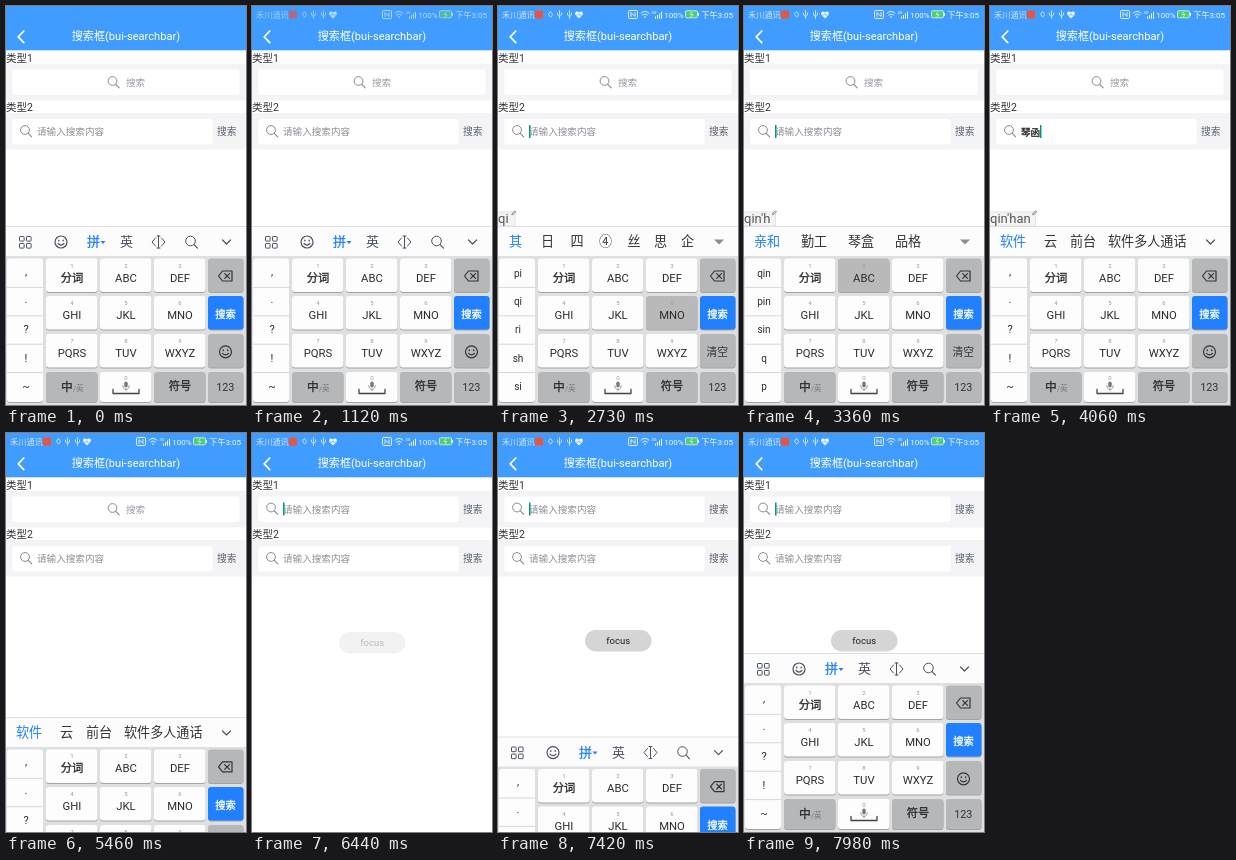
An HTML page for the animation above (8000 ms loop, 240x399 px).

```html
<!DOCTYPE html>
<html lang="zh-CN">
<head>
<meta charset="utf-8">
<title>搜索框</title>
<style>
  html, body { margin: 0; width: 100%; height: 100%; overflow: hidden; background: #fff; }
  svg { display: block; width: 100%; height: 100%; }
  text { font-family: Roboto, "Noto Sans CJK SC", "Noto Sans CJK", sans-serif; }
  .mid { text-anchor: middle; }
  .line { fill: none; stroke-linecap: round; stroke-linejoin: round; }
</style>
</head>
<body>
<svg id="stage" viewBox="0 0 240 399"></svg>
<script>
const LOOP = 8000, STEP = 70;
const BLUE = '#409cff', ACTION = '#2080ff', INK = '#4a5260', DARK = '#2b2b2b';
const KEY = '#fdfdfd', GREY = '#b6b7b8', DOWN = '#b9b9ba', TEAL = '#009688', HINT = '#8c9097';

const rect = (x, y, w, h, fill, more = '') =>
  `<rect x="${x}" y="${y}" width="${w}" height="${h}" fill="${fill}" ${more}/>`;
const text = (x, y, size, fill, s, more = '') =>
  `<text x="${x}" y="${y}" font-size="${size}" fill="${fill}" ${more}>${s}</text>`;
const mid = (x, y, size, fill, s, more = '') => text(x, y, size, fill, s, `class="mid" ${more}`);
const heavy = color => `stroke="${color}" stroke-width=".3"`;
const line = (d, color, w = 1, more = '') =>
  `<path class="line" d="${d}" stroke="${color}" stroke-width="${w}" ${more}/>`;
const ring = (x, y, r, color, w = 1) =>
  `<circle cx="${x}" cy="${y}" r="${r}" fill="none" stroke="${color}" stroke-width="${w}"/>`;
const group = (id, body) => `<g id="${id}">${body}</g>`;

const lens = (x, y, color, r = 4.4) =>
  ring(x, y, r, color) + line(`M${x + r * .75} ${y + r * .75}l3.4 3.6`, color, 1.1);
const smiley = (x, y, color) => ring(x, y, 6, color, 1.2) +
  line(`M${x - 2.2} ${y - 1.8}v.6M${x + 2.2} ${y - 1.8}v.6`, color, 1.4) +
  line(`M${x - 3} ${y + 1.5}q3 3.2 6 0`, color, 1.1);
const chevron = line('M216.5 234l4 4 4-4', INK, 1.2);

function statusBar() {
  const w = '#f2f8ff';
  const usb = x => line(`M${x} 4.5v8M${x - 2} 7v2l2 1.5 2-1.5v-2`, w, .7);
  return text(4, 12, 8.2, '#cfe4ff', '禾川通讯') +
    rect(37, 4.5, 8, 8, '#e8553f', 'rx="1"') +
    line('M52.7 5.8l2 2.7-2 2.7-2-2.7z', w, .7) + usb(61.5) + usb(71.5) +
    `<path d="M81 12.5l-3.6-3.6q-.9-3 1.6-3.4 1.4 0 2 1.3.6-1.3 2-1.3 2.5.4 1.6 3.4z" fill="${w}"/>` +
    line('M78.5 9h1.6l.9-1.3 1 2 .7-.7h1', BLUE, .6) +
    rect(130.5, 4.5, 9, 8, 'none', `stroke="${w}" stroke-width=".9" rx="1"`) +
    line('M133 10.5v-4l4 4v-4', w, .9) +
    line('M143 7.2q4-3.8 8 0M144.6 9q2.4-2.3 4.8 0', w, .9) +
    `<path d="M145.8 10.4h2.4l-1.2 1.8z" fill="${w}"/>` +
    text(153.5, 7.6, 4, w, '4G') +
    line('M157.5 12.3v-1.4M159.5 12.3v-2.8M161.5 12.3v-4.5M163.5 12.3v-6.2', w, 1) +
    text(166.3, 11.7, 8, w, '100%') +
    rect(187.5, 4.8, 12, 7, '#4fd06a', `rx="1" stroke="${w}" stroke-width=".7"`) +
    rect(199.8, 7, 1.2, 2.8, w) + line('M193.9 6l-1.8 2.5h2.8l-1.8 2.4', w, .7) +
    text(203.3, 12, 8.1, w, '下午3:05');
}

// Left-aligned bar with its own submit label; y is the top of the field
const activeBar = (y, id) => rect(6.3, y, 200.4, 25.5, '#fff', 'rx="2.5"') +
  lens(19, y + 11, '#8b8b8b') +
  text(31, y + 16.4, 9.6, HINT, '请输入搜索内容', `id="hint${id}"`) +
  text(211, y + 16.2, 9.8, '#596070', '搜索') +
  rect(31, y + 6, 1.5, 13, TEAL, `id="caret${id}"`);

function page() {
  return rect(0, 0, 240, 399, '#fff') + rect(0, 0, 240, 44.3, BLUE) +
    line('M17.8 25l-5.6 5.8 5.6 5.8', '#fff', 1.7) +
    mid(119.9, 34.2, 11.1, '#fff', '搜索框(bui-searchbar)') +
    group('status', statusBar()) +
    text(0, 55.8, 10.5, '#333', '类型1') + rect(0, 58, 240, 36.5, '#f4f4f6') +
    text(0, 105, 10.5, '#333', '类型2') + rect(0, 107, 240, 36.5, '#f4f4f6') +
    group('idle', rect(6.3, 63.5, 227.2, 25.5, '#fff', 'rx="2.5"') +
      lens(106.5, 75, '#8b8b8b') + text(120, 79.8, 9.6, '#989ca4', '搜索')) +
    group('first', activeBar(63.5, 1)) + activeBar(113, 2) +
    text(31, 129.5, 9.6, '#222', '琴函', `id="typed" ${heavy('#222')}`);
}

const cap = (x, y, w, h, fill, id = '') =>
  rect(x, y + 1, w, h, '#a3a4a6', 'rx="3"') +
  rect(x, y, w, h, fill, `rx="3" ${id && `id="${id}"`}`);

function keyboard() {
  const cols = [40, 94, 148], rows = [252.5, 290, 328];
  const names = ['分词', 'ABC', 'DEF', 'GHI', 'JKL', 'MNO', 'PQRS', 'TUV', 'WXYZ'];
  let s = rect(0, 220, 240, 200, '#dedfe0') + rect(0, 221, 240, 29, '#fcfcfd');

  s += group('tools',
    [[13, 230], [20, 230], [13, 237], [20, 237]].map(([x, y]) =>
      rect(x + .5, y + .5, 4.6, 4.6, 'none', `stroke="${INK}" rx=".6"`)).join('') +
    smiley(55, 236, INK) + text(81, 240.3, 13, ACTION, '拼', heavy(ACTION)) +
    `<path d="M94.5 235h5l-2.5 3z" fill="${ACTION}"/>` + text(114, 240.3, 13, INK, '英') +
    line('M149.5 232l-3.5 4 3.5 4M155.5 232l3.5 4-3.5 4M152.5 230v12M151 230h3M151 242h3', INK) +
    lens(184.5, 235, INK, 4.8) + chevron);
  s += group('words', '') + group('fold', chevron) +
    '<path id="more" d="M216 233.500h10l-5 5z" fill="#8b8d91"/>';

  s += cap(1, 252.5, 36, 143.5, KEY);
  for (let i = 1; i < 5; i++) s += rect(1, 252.5 + 28.4 * i, 36, 1, '#d6d7d9');
  s += group('side', '');

  names.forEach((name, i) => {
    const x = cols[i % 3], y = rows[i / 3 | 0];
    s += cap(x, y, 51.5, 33.5, KEY, 'key' + (i + 1)) +
      mid(x + 26, y + 9, 6, '#999', i + 1) +
      mid(x + 26, y + 23, 11.3, DARK, name, i ? '' : heavy(DARK));
  });

  s += cap(40, 366, 51.5, 30, GREY) + text(55, 384.5, 11.8, DARK, '中', heavy(DARK)) +
    text(67, 385, 7.5, '#777', '/英') +
    cap(94, 366, 51.5, 30, KEY) + mid(120, 373.5, 6, '#999', '0') +
    rect(118.3, 375.5, 3.4, 6, '#777', 'rx="1.7"') +
    line('M116.8 379.5q0 3.800 3.200 3.800t3.200-3.800M120 383.300v1.500', '#888', .8) +
    line('M107 383.500v4h26v-4', '#444', 1.3) +
    cap(148, 366, 51.5, 30, GREY) + mid(174, 384.2, 11.2, DARK, '符号', heavy(DARK));

  const x = 202, w = 35.5;
  s += cap(x, 252.5, w, 33.5, GREY) +
    line('M212.5 270l4-5h9.500v10h-9.500zM218.700 267.600l4.800 4.800M223.500 267.600l-4.800 4.800', '#333', 1.2) +
    cap(x, 290, w, 33.5, ACTION) + mid(219.5, 312, 10.3, '#fff', '搜索', heavy('#fff')) +
    cap(x, 328, w, 33.5, GREY) + group('face', smiley(219.5, 345.8, '#333')) +
    mid(219.3, 349.5, 10.8, '#333', '清空', 'id="clear"') +
    cap(x, 366, w, 30, GREY) + mid(219.3, 384.5, 10.8, '#333', '123');

  return s + group('popup',
    rect(-1, 206, 19, 14, '#f4f4f4', 'id="tag" stroke="#ddd" stroke-width=".8"') +
    text(0, 217.4, 13, '#555', '', 'id="pinyin"') +
    line('M-2 208.5l.5-1.5 2.5-2.2 1 1-2.5 2.3z', '#777', .8, 'id="pen"'));
}

const toast = () => rect(87, 197, 66.5, 21.5, '#d5d5d5', 'rx="10.7"') +
  mid(120.2, 211.2, 9.5, '#222', 'focus');

document.getElementById('stage').innerHTML =
  page() + group('toast', toast()) + group('board', keyboard());
const $ = id => document.getElementById(id);

const marks = [',', '.', '?', '!', '~'];
const single = [11, 43, 72.5, 101, 129.5, 156, 183], double = [10, 57, 104, 151];
const after = ['软件', '云', '前台', '软件多人通话'], afterX = [10, 54, 80, 118];
const syll = ['qin', 'pin', 'sin', 'q', 'p'], hs = ['han', 'gan', 'hao', 'gao', 'h'];
// start, pinyin, candidates, their x, side column
const states = [
  [0, '', null, single, marks],
  [2310, 'q', [...'去其日是四前人'], single, ['p', 'q', 'r', 's', '7']],
  [2590, 'qi', [...'其日四④丝思企'], single, ['pi', 'qi', 'ri', 'sh', 'si']],
  [2870, 'qin', [...'亲品琴拼勤贫秦'], single, syll],
  [3290, "qin'h", ['亲和', '勤工', '琴盒', '品格'], double, syll],
  [3500, "qin'ha", ['琴函', '品尝', '亲哈', '拼好'], double, hs],
  [3780, "qin'han", ['琴函', '亲汗', '勤干', '拼好'], double, hs],
  [3920, "qin'han", after, afterX, marks],
  [4130, '', after, afterX, marks],
  [5810, '', null, single, marks]
];
const presses = [[7, 1750, 2310], [4, 2450, 2590], [6, 2730, 2870],
  [4, 3150, 3290], [2, 3360, 3500], [6, 3570, 3780]];

const within = (t, a, b) => t >= a && t < b;
const clamp = v => Math.max(0, Math.min(1, v));
const show = (id, on) => { $(id).style.display = on ? '' : 'none'; };
let shown = null;

function setState(state) {
  if (state === shown) return;
  shown = state;
  const [, pinyin, words, xs, side] = state;
  const composing = !!pinyin && words !== after;
  $('words').innerHTML = words ? words.map((w, i) =>
    text(xs[i], 240.3, 13.1, i ? '#333' : ACTION, w)).join('') : '';
  $('side').innerHTML = side.map((s, i) => {
    const lift = s === ',' || s === '.' ? 2.5 : 0;
    return mid(20, 271 + 28.2 * i - lift, side === marks ? 11 : 10, DARK, s);
  }).join('');
  show('tools', !words);
  show('fold', words && !composing);
  show('more', composing);
  show('face', !composing);
  show('clear', composing);
  show('popup', pinyin);
  $('pinyin').textContent = pinyin;
  const end = pinyin ? Math.max(17, $('pinyin').getComputedTextLength() + 5) : 0;
  $('tag').setAttribute('width', end + 1);
  $('pen').setAttribute('transform', `translate(${end - 1} 0)`);
}

function draw(now) {
  const t = Math.floor(now % LOOP / STEP) * STEP;
  setState(states.filter(s => s[0] <= t).pop());
  $('status').setAttribute('opacity', clamp(t / 1680));

  const typed = within(t, 3920, 4830), focused = t >= 6020;
  show('idle', !focused);
  show('first', focused);
  show('typed', typed);
  show('hint2', !typed);
  show('caret2', within(t, 1750, 4830) && !within(t, 4270, 4410) && !within(t, 4550, 4690));
  $('caret2').setAttribute('x', typed ? 50 : 31);

  for (const [n] of presses) $('key' + n).setAttribute('fill', KEY);
  for (const [n, a, b] of presses) if (within(t, a, b)) $('key' + n).setAttribute('fill', DOWN);

  const out = clamp((t - 4970) / 840), back = clamp((t - 7140) / 840);
  const drop = 188 * (t < 6500 ? out * out : (1 - back) ** 2);
  $('board').setAttribute('transform', `translate(0 ${drop})`);

  const rise = clamp((t - 6440) / 350);
  show('toast', t >= 6440);
  $('toast').setAttribute('opacity', .3 + .7 * rise);
  $('toast').setAttribute('transform', `translate(0 ${2 * (1 - rise)})`);
}

const start = performance.now();
function tick() {
  draw(performance.now() - start);
  requestAnimationFrame(tick);
}
tick();
</script>
</body>
</html>
```
